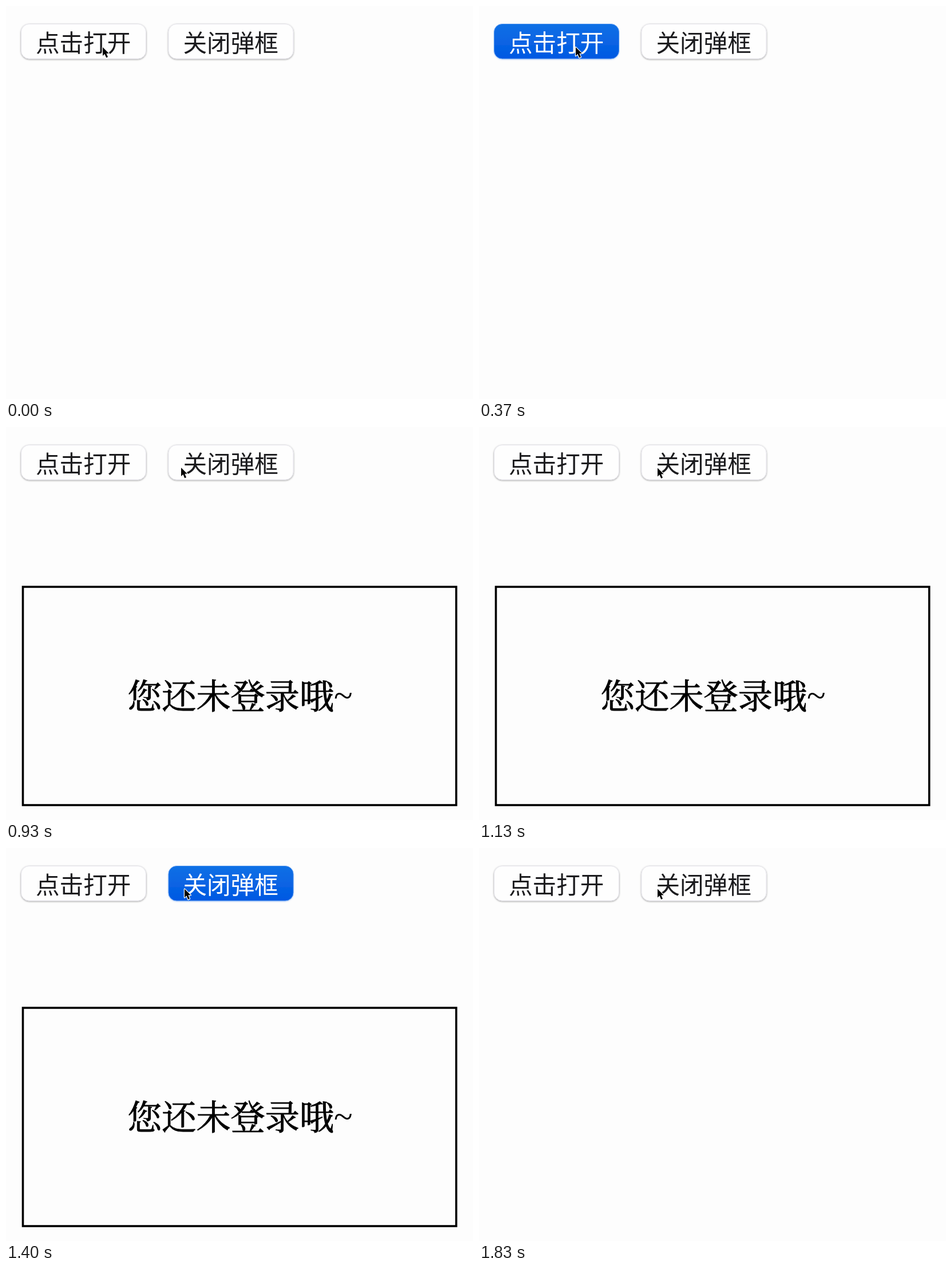
Animation of 816x686 px, one loop 1.86 s. Source, as an HTML page:

```html
<!DOCTYPE html>
<html lang="zh-CN">
<head>
<meta charset="utf-8">
<title>弹框</title>
<style>
  html, body { margin: 0; width: 100%; height: 100%; overflow: hidden; background: #fdfdfd; }
  svg { display: block; width: 816px; height: 686px; }
  .label { font: 41.6px "Noto Sans CJK SC", "Noto Sans CJK", sans-serif; fill: #1b1b1e; }
  .face { fill: #fefefe; stroke: #e4e3ea; filter: url(#drop); }
  .pressed .face { fill: url(#blue); stroke: #4a90ee; filter: url(#faint); }
  .pressed .label { fill: #fff; }
  .note { font: 60.2px "Noto Serif CJK SC", "Noto Serif SC", "Noto Sans CJK SC", "Noto Sans CJK", serif; stroke: #000; stroke-width: .9; }
  .tilde { font: 60.2px "Liberation Serif", serif; }
</style>
</head>
<body>
<svg viewBox="0 0 816 686">
  <defs>
    <linearGradient id="blue" x2="0" y2="1">
      <stop offset="0" stop-color="#1170e5"/>
      <stop offset="1" stop-color="#0058e2"/>
    </linearGradient>
    <filter id="drop" x="-10%" y="-20%" width="120%" height="150%">
      <feDropShadow dx="0" dy="1" stdDeviation="1.5" flood-opacity=".4"/>
    </filter>
    <filter id="faint" x="-10%" y="-20%" width="120%" height="150%">
      <feDropShadow dx="0" dy="1" stdDeviation="1" flood-color="#0058e2" flood-opacity=".3"/>
    </filter>
  </defs>

  <g id="open">
    <rect class="face" x="26.5" y="31.5" width="218" height="60.5" rx="14"/>
    <text class="label" x="52" y="79.5">点击打开</text>
  </g>
  <g id="close" transform="translate(257.5 0)">
    <rect class="face" x="26.5" y="31.5" width="218" height="60.5" rx="14"/>
    <text class="label" x="52" y="79.5">关闭弹框</text>
  </g>

  <g id="dialog">
    <rect x="29.5" y="279" width="757.2" height="381" fill="none" stroke="#000" stroke-width="3.6"/>
    <text class="note" x="212" y="492">您还未登录哦</text>
    <text class="tilde" x="573" y="489">~</text>
  </g>

  <path id="cursor" d="M1 2V17L4.4 13.8L7.2 20.3L10 19.1L7.3 12.8H11.8Z"
        fill="#000" stroke="#fff" stroke-width="2.4" stroke-linejoin="round" paint-order="stroke"/>
</svg>

<script>
  const LOOP = 1860, FRAMES = 56;
  const OPEN = { down: 230, up: 400 };
  const CLOSE = { down: 1330, up: 1470 };
  // time in ms, x, y of the pointer tip
  const PATH = [
    [530, 168, 70], [600, 175, 70.5], [670, 197, 71], [730, 223, 71],
    [800, 259, 70], [870, 288, 69.5], [930, 305, 69], [1000, 309.5, 69.5], [1070, 311, 69.5]
  ];

  const [openBtn, closeBtn, dialog, cursor] =
    ["open", "close", "dialog", "cursor"].map(id => document.getElementById(id));
  const within = (t, span) => t >= span.down && t < span.up;

  function pointer(t) {
    const i = PATH.findIndex(p => p[0] > t);
    if (i === 0) return PATH[0].slice(1);
    if (i < 0) return PATH[PATH.length - 1].slice(1);
    const a = PATH[i - 1], b = PATH[i];
    const k = (t - a[0]) / (b[0] - a[0]);
    return [1, 2].map(n => a[n] + (b[n] - a[n]) * k);
  }

  function snap(t) {
    const at = n => Math.round(n * 10 / 3) * 10;
    let n = Math.min(FRAMES - 1, Math.ceil(t * 3 / 100));
    while (n > 0 && at(n) > t) n--;
    return at(n);
  }

  function draw(t) {
    openBtn.classList.toggle("pressed", within(t, OPEN));
    closeBtn.classList.toggle("pressed", within(t, CLOSE));
    dialog.style.display = t >= OPEN.up && t < CLOSE.up ? "" : "none";
    cursor.setAttribute("transform", `translate(${pointer(t).join(" ")})`);
  }

  const start = performance.now();
  function tick() {
    draw(snap((performance.now() - start) % LOOP));
    requestAnimationFrame(tick);
  }
  tick();
</script>
</body>
</html>
```
